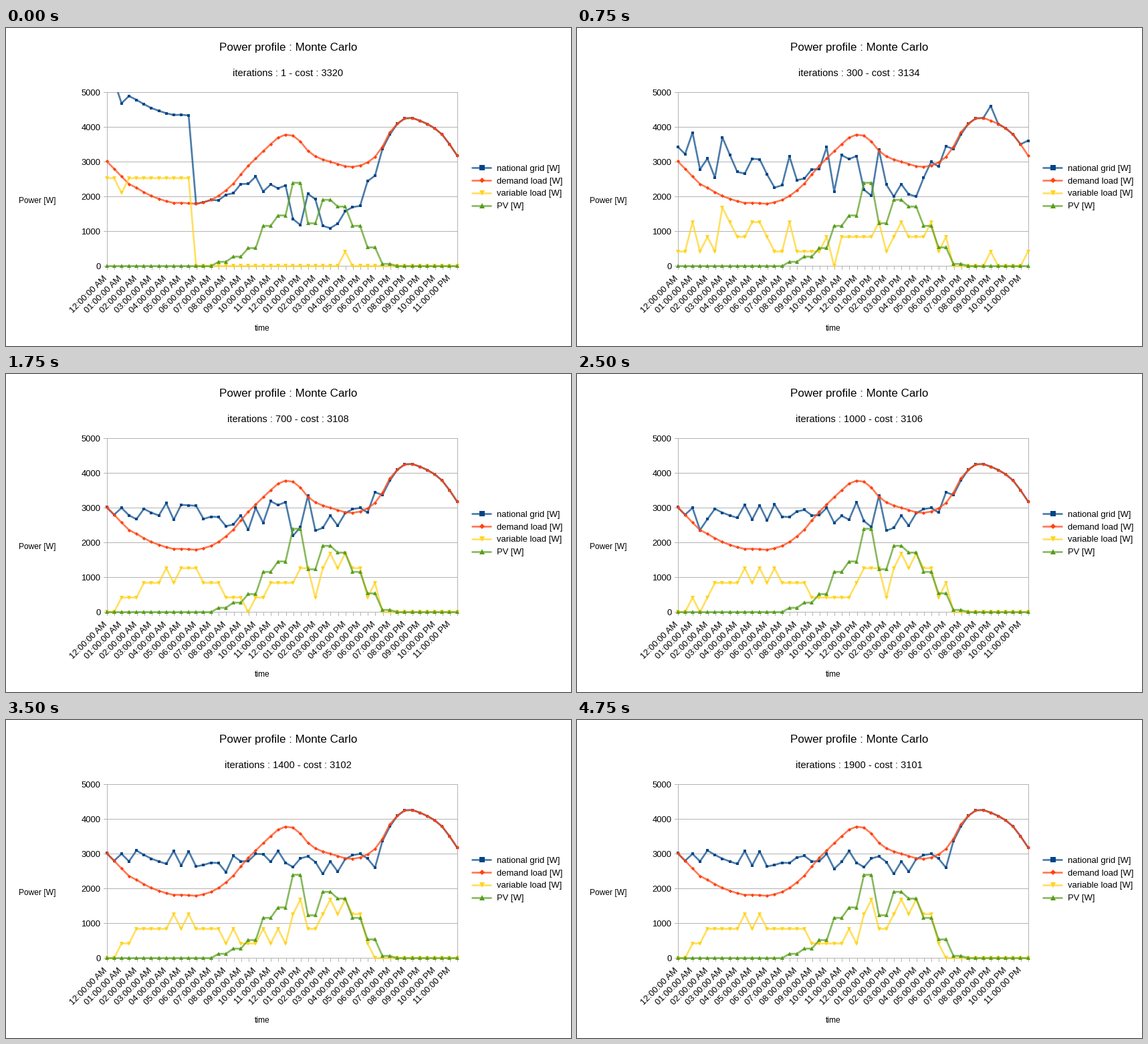
Recreate the animation shown at these times as a matplotlib script. Size 845 by 476 pixels, loop 5000 ms.

```python
import math
import random

import matplotlib.pyplot as plt
import numpy as np
from matplotlib.animation import FuncAnimation
from matplotlib.patches import Rectangle

W, H, DPI = 845, 476, 100
PX = 72 / DPI  # points per pixel
LEFT, RIGHT, TOP, BOTTOM = 150.5, 674.5, 96.5, 356.5
SLOTS = 48
UNIT = 422  # watts per shiftable load unit
Y_MAX = 5000
GRAY = "#b3b3b3"

DEMAND = np.array([
    3020, 2805, 2580, 2365, 2255, 2130, 2020, 1940, 1870, 1820, 1825, 1810,
    1795, 1840, 1905, 2020, 2180, 2375, 2640, 2890, 3100, 3310, 3510, 3700,
    3785, 3755, 3585, 3320, 3160, 3070, 3005, 2940, 2875, 2860, 2895, 2985,
    3145, 3440, 3855, 4100, 4255, 4265, 4190, 4095, 3970, 3790, 3510, 3190])

# Solar output is hourly, starting at 07:30.
SUN = [125, 275, 520, 1160, 1460, 2400, 1235, 1910, 1715, 1160, 540, 65]
PV = np.zeros(SLOTS)
PV[15:39] = np.repeat(SUN, 2)

# Load units per half hour: all packed at night, then scattered.
NIGHT = np.zeros(SLOTS, int)
NIGHT[:12] = 6
NIGHT[2] = 5
NIGHT[32] = 1
SCATTERED = np.zeros(SLOTS, int)
SCATTERED[:37] = [
    1, 1, 3, 1, 2, 1, 4, 3, 2, 2, 3, 3, 2, 1, 1, 3, 1, 1, 1, 1,
    2, 0, 2, 2, 2, 2, 2, 3, 1, 2, 3, 2, 2, 2, 3, 1, 2]
SCATTERED[[42, 47]] = 1


def spread(a, b):
    """Slots that lose and gain a unit on the way from a to b."""
    gain = np.repeat(np.arange(SLOTS), np.maximum(b - a, 0))
    loss = np.repeat(np.arange(SLOTS), np.maximum(a - b, 0))
    return list(loss), list(gain)


# (iterations reached, cost reached, slots losing a unit, slots gaining one)
STAGES = [
    (300, 3134, *spread(NIGHT, SCATTERED)),
    (500, 3111, [2, 2, 4, 6, 6, 7, 11, 20, 27, 42, 47],
     [8, 12, 14, 16, 17, 21, 26, 30, 31, 32, 33]),
    (700, 3108, [0, 1, 15, 16, 17, 19], [5, 11, 13, 27, 29, 32]),
    (1000, 3106, [3, 8, 10, 12, 22, 23], [9, 13, 16, 17, 19, 25]),
    (1400, 3102, [13, 16, 24, 27, 36, 36], [3, 4, 21, 23, 26, 28]),
    (1900, 3101, [21], [16]),
]
rng = random.Random(4)
for stage in STAGES:
    rng.shuffle(stage[2])
    rng.shuffle(stage[3])


def state(count):
    """Load units and cost after a number of iterations."""
    units = NIGHT.copy()
    start, cost = 1, 3320
    for end, next_cost, loss, gain in STAGES:
        if count <= start:
            break
        part = min(1, math.log(count / start) / math.log(end / start))
        moves = round(part * len(loss))
        np.add.at(units, loss[:moves], -1)
        np.add.at(units, gain[:moves], 1)
        cost += (next_cost - cost) * part
        start = end
    return units, round(cost)


# The small margin keeps the pixel size from rounding down.
fig = plt.figure(figsize=((W + 0.01) / DPI, (H + 0.01) / DPI), dpi=DPI,
                 facecolor="white")
ax = fig.add_axes([0, 0, 1, 1])
ax.set_xlim(0, W)
ax.set_ylim(H, 0)
ax.axis("off")

xs = np.linspace(LEFT, RIGHT, SLOTS)


def to_y(value):
    return BOTTOM - (BOTTOM - TOP) * np.asarray(value) / Y_MAX


def text(x, y, label, size, ha="left", **kw):
    return ax.text(x, y, label, fontsize=size * PX, ha=ha, va="baseline",
                   family="Liberation Sans", color="black", **kw)


def rule(x0, y0, x1, y1):
    ax.plot([x0, x1], [y0, y1], color=GRAY, lw=PX, zorder=1)


# Grid, frame and ticks
for value in range(0, Y_MAX + 1, 1000):
    y = math.floor(to_y(value)) + 0.5
    rule(LEFT - 5, y, RIGHT, y)
    text(141.5, y + 4.5, str(value), 13, "right")
rule(LEFT, TOP, LEFT, BOTTOM)
rule(RIGHT, TOP, RIGHT, BOTTOM)
for i, x in enumerate(xs):
    x = math.floor(x) + 0.5
    rule(x, BOTTOM, x, BOTTOM + 5)
    if i % 2 == 0:
        hour = i // 2
        label = f"{hour % 12 or 12:02d}:00:00 {'AM' if hour < 12 else 'PM'}"
        text(x + 1.5, 375, label, 13, "right", rotation=45,
             rotation_mode="anchor")

# Titles
text(422, 34, "Power profile : Monte Carlo", 17, "center")
subtitle = text(422, 72, "", 14.67, "center")
text(18.5, 262, "Power [W]", 12)
text(383, 453, "time", 12, "center")

SERIES = [
    ("national grid [W]", "#004586", "s", 5, 8),
    ("demand load [W]", "#ff420e", "D", 3.8, 6),
    ("variable load [W]", "#ffd320", "v", 6, 8.5),
    ("PV [W]", "#579d1c", "^", 6, 8.5),
]
window = Rectangle((LEFT - 5, TOP - 0.5), RIGHT - LEFT + 10,
                   BOTTOM - TOP + 6, transform=ax.transData)


def pair(color, marker, size, z):
    """A translucent line and the solid markers above it."""
    line, = ax.plot([], [], color=color, alpha=0.7, lw=2.7 * PX, zorder=z,
                    solid_capstyle="butt", solid_joinstyle="round")
    dots, = ax.plot([], [], ls="", marker=marker, ms=size * PX, color=color,
                    mew=0, zorder=z + 0.5)
    return line, dots


plots = []
for k, (name, color, marker, small, large) in enumerate(SERIES):
    line, dots = pair(color, marker, small, 2 + k)
    line.set_clip_path(window)
    plots.append((line, dots))

    y = 209.5 + 18.7 * k
    key, key_dot = pair(color, marker, large, 2)
    key.set_data([696, 726], [y, y])
    key_dot.set_data([711.5], [y])
    text(733.5, round(y + 4.5), name, 13)


def update(n):
    count = max(1, 100 * n)
    units, cost = state(count)
    load = units * UNIT
    subtitle.set_text(f"iterations : {count} - cost : {cost}")
    for (line, dots), data in zip(
            plots, (DEMAND + load - PV, DEMAND, load, PV)):
        ys = to_y(data)
        line.set_data(xs, ys)
        shown = data <= Y_MAX
        dots.set_data(xs[shown], ys[shown])
    return [subtitle]


anim = FuncAnimation(fig, update, frames=20, interval=250, repeat=True,
                     repeat_delay=0, blit=False)
plt.show()
```
